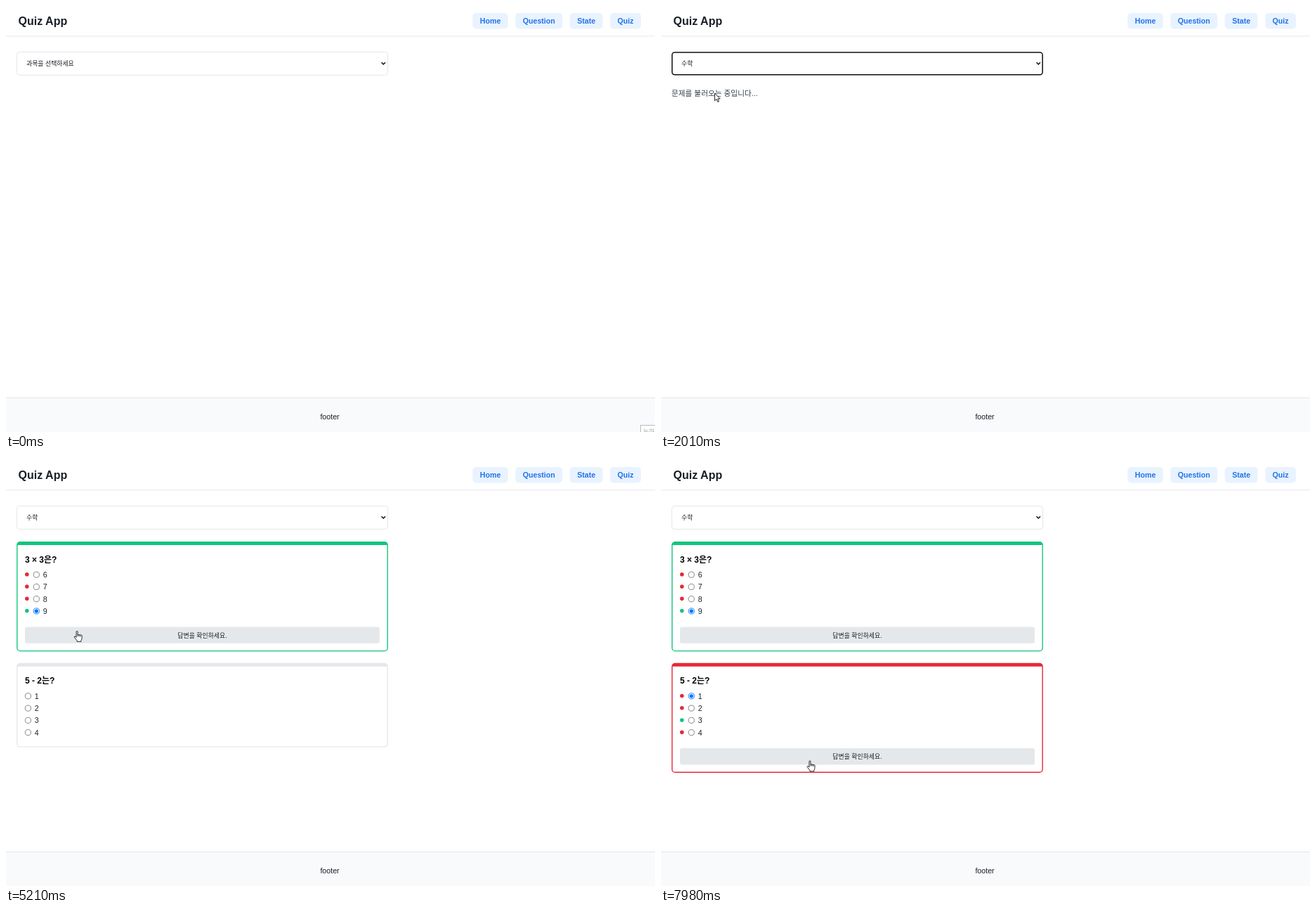
An HTML page that plays this animation: 924 by 606 pixels, repeating every 8000 ms.

```html
<!DOCTYPE html>
<html lang="ko">
<head>
<meta charset="utf-8">
<title>Quiz</title>
<style>
  html, body { margin: 0; width: 100%; height: 100%; overflow: hidden; background: #fff; }
  svg { display: block; width: 924px; height: 606px; }
  text { font: 10.67px "Liberation Sans", "Noto Sans CJK KR", "Noto Sans CJK", sans-serif; fill: #191f28; white-space: pre; }
  .title { font-size: 16px; font-weight: bold; }
  .nav { font-weight: bold; fill: #2272eb; }
  .mid { text-anchor: middle; }
  .small { font-size: 8.89px; }
  .item { font-size: 8.7px; }
  .ask { font-size: 12px; font-weight: bold; fill: #000; }
  #menu { filter: drop-shadow(0 1px 2px rgba(0, 0, 0, .35)); }
  #cursor path { fill: #fff; stroke: #111; stroke-width: .9; stroke-linejoin: round; }
</style>
</head>
<body>
<svg viewBox="0 0 924 606">
  <rect width="924" height="606" fill="#fff"/>
  <rect y="42.4" width="924" height="1" fill="#e5e8eb"/>
  <text class="title" x="17.6" y="26.5">Quiz App</text>
  <g id="nav"></g>

  <rect id="box" fill="#fff"/>
  <text id="subject" class="small" x="29" y="84.7"></text>
  <path d="M534.6 80.2l2.7 2.8 2.7-2.8" fill="none" stroke="#111" stroke-width="1.5"/>

  <text id="loading" x="15" y="128.4" style="fill:#333d4b">문제를 불러오는 중입니다...</text>
  <g id="cards"></g>

  <rect y="557" width="924" height="49" fill="#f9fafb"/>
  <rect y="557" width="924" height="1" fill="#e1e4e8"/>
  <text class="mid" x="461" y="587.5">footer</text>

  <g id="menu">
    <rect x="15.5" y="98.5" width="528" height="54.7" fill="#fff" stroke="#777"/>
    <rect id="bar" x="16" width="527" height="18" fill="#1967d2"/>
  </g>
  <g id="tip">
    <rect x="903.5" y="596.5" width="40" height="20" fill="#fff" stroke="#b8b8b8"/>
    <text class="small" x="907" y="609" style="fill:#aaa">녹화</text>
  </g>
  <g id="cursor">
    <path id="arrow" d="M.5 .5V11.4L3 9.1l1.8 4 1.7-.8-1.8-3.8H8.2Z"/>
    <path id="hand" d="M-1 1a1 1 0 0 1 2 0V5.5q1.2-1 2 0 1.3-.7 2 .2 1.6-.5 2 .8V10q0 2-1.2 3.2V15H0V13.5L-4 8.6q.3-1.6 1.8-.9L-1 9ZM1 5.5v2M3 5.7v2M5 6v2"/>
  </g>
</svg>
<script>
const LOOP = 8000, STEP = 67;
const GREY = '#e5e8eb', GREEN = '#15c47e', RED = '#e42939';

// When things happen, in ms
const AT = {
  tipGone: 70, enter: 270, menu: 1140, hover: 1680, choose: 1940, load: 2010, cards: 2070,
  blur: 4150, pickFirst: 4280, gradeFirst: 5010, pickSecond: 6770, gradeSecond: 7580
};
const START = [808, 569];
const MOVES = [
  { from: 270, to: 1010, x: 84, y: 91 },
  { from: 1413, to: 1700, x: 76, y: 123.5, bow: 4 },
  { from: 2463, to: 2880, x: 38, y: 195, bow: 28 },
  { from: 3013, to: 3210, x: 37, y: 175 },
  { from: 3343, to: 3680, x: 28, y: 204 },
  { from: 3750, to: 3890, x: 31, y: 214 },
  { from: 4543, to: 4940, x: 101, y: 243 },
  { from: 5143, to: 5340, x: 108, y: 262 },
  { from: 5473, to: 6300, x: 41, y: 381 },
  { from: 6303, to: 6700, x: 31, y: 329 },
  { from: 6770, to: 7170, x: 164, y: 415 },
  { from: 7173, to: 7370, x: 207, y: 432 },
  { from: 7443, to: 7980, x: 212, y: 427.9 }
];

const $ = id => document.getElementById(id);
const show = (el, on) => { el.style.display = on ? '' : 'none'; };
const ease = k => (1 - Math.cos(Math.PI * k)) / 2;

function set(el, attrs) {
  for (const key in attrs) el.setAttribute(key, attrs[key]);
}
function add(parent, tag, attrs, text) {
  const el = document.createElementNS('http://www.w3.org/2000/svg', tag);
  set(el, attrs);
  if (text) el.textContent = text;
  return parent.appendChild(el);
}

// Navigation pills, laid out from the right edge
let right = 904;
for (const label of ['Quiz', 'State', 'Question', 'Home']) {
  const pad = 10.4, gap = 10.5;
  const pill = add($('nav'), 'rect', { y: 10, height: 22.4, rx: 5, fill: '#e8f3ff' });
  const text = add($('nav'), 'text', { class: 'nav', y: 24.6 }, label);
  const width = text.getComputedTextLength() + 2 * pad;
  set(pill, { x: right - width, width });
  set(text, { x: right - width + pad });
  right -= width + gap;
}

const items = ['과목을 선택하세요', '수학', '국어'].map((label, i) =>
  add($('menu'), 'text', { class: 'item', x: 29, y: 111.6 + i * 17.9 }, label));

function makeCard(question, answers, correct, picked) {
  const top = 116.1;
  const root = add($('cards'), 'g');
  const frame = add(root, 'rect', { x: 15.1, y: top, width: 528.8, rx: 5 });
  const inner = add(root, 'path', { fill: '#fff' });
  add(root, 'text', { class: 'ask', x: 27, y: 145.6 }, question);
  const rows = answers.map((label, i) => {
    const cy = 163.1 + i * 17.27;
    const dot = add(root, 'circle', { cx: 29.8, cy: cy - .3, r: 2.8, fill: i === correct ? GREEN : RED });
    const radio = add(root, 'g');
    const ring = add(radio, 'circle', { cx: 31.4, cy, r: 4.1, fill: '#fff', 'stroke-width': .9 });
    const core = add(radio, 'circle', { cx: 31.4, cy, r: 2.6 });
    add(radio, 'text', { x: 40.8, y: cy + 4.1 }, label);
    return { dot, radio, ring, core };
  });
  const button = add(root, 'g');
  add(button, 'rect', { x: 27, y: 237.4, width: 505, height: 23.4, rx: 2.7, fill: GREY });
  add(button, 'text', { class: 'small mid', x: 279.5, y: 252.6 }, '답변을 확인하세요.');

  return (shift, checked, graded, hover) => {
    const height = checked ? 156.2 : 119.8;
    const blue = hover ? '#005cc8' : '#0075ff';
    set(root, { transform: `translate(0 ${shift})` });
    set(frame, { height, fill: !graded ? GREY : picked === correct ? GREEN : RED });
    set(inner, { d: `M16.5 121H542.5V${top + height - 5}q0 3.6-3.6 3.6H20.1q-3.6 0-3.6-3.6Z` });
    show(button, checked);
    rows.forEach((row, i) => {
      const on = checked && i === picked;
      show(row.dot, graded);
      show(row.core, on);
      set(row.radio, { transform: `translate(${graded ? 11.9 : 0} 0)` });
      set(row.ring, { stroke: on ? blue : '#767676' });
      set(row.core, { fill: blue });
    });
  };
}
const drawFirst = makeCard('3 × 3은?', ['6', '7', '8', '9'], 3, 3);
const drawSecond = makeCard('5 - 2는?', ['1', '2', '3', '4'], 2, 0);

function pointerAt(t) {
  let [x, y] = START;
  for (const m of MOVES) {
    if (t < m.from) break;
    const k = Math.min(1, (t - m.from) / (m.to - m.from));
    x += (m.x - x) * ease(k) + (m.bow || 0) * Math.sin(Math.PI * k);
    y += (m.y - y) * ease(k);
  }
  return [x, y];
}

function drawSelect(t) {
  const chosen = t >= AT.choose;
  $('subject').textContent = items[chosen ? 1 : 0].textContent;
  set($('box'), chosen && t < AT.blur
    ? { x: 15.8, y: 65.9, width: 527.4, height: 31.8, rx: 3.6, stroke: '#101010', 'stroke-width': 1.5 }
    : { x: 15.4, y: 65.4, width: 528.2, height: 33, rx: 4, stroke: '#e1e4e8', 'stroke-width': .9 });

  const hot = t >= AT.hover ? 1 : 0;
  show($('menu'), t >= AT.menu && !chosen);
  $('menu').style.opacity = Math.min(1, .4 * (1 + Math.floor((t - AT.menu) / STEP)));
  set($('bar'), { y: 99 + hot * 18 });
  items.forEach((el, i) => { el.style.fill = i === hot ? '#fff' : '#191f28'; });
}

function drawCursor(t) {
  // The pointer is sampled at about 15 positions a second
  const [x, y] = pointerAt(Math.floor((t + 8) / STEP) * STEP);
  const hand = t > AT.pickFirst && (y > 237.5 && y < 261 || y > 410 && y < 433);
  show($('cursor'), t >= AT.enter);
  show($('hand'), hand);
  show($('arrow'), !hand);
  set($('cursor'), { transform: `translate(${x} ${y})` });
}

function draw(t) {
  const open = t >= AT.pickFirst;
  show($('tip'), t < AT.tipGone);
  show($('loading'), t >= AT.load && t < AT.cards);
  show($('cards'), t >= AT.cards);
  drawSelect(t);
  drawFirst(0, open, t >= AT.gradeFirst, t < AT.pickFirst + 360);
  drawSecond(open ? 172.7 : 136.4, t >= AT.pickSecond, t >= AT.gradeSecond, t < AT.pickSecond + STEP);
  drawCursor(t);
}

function tick() {
  draw(performance.now() % LOOP);
  requestAnimationFrame(tick);
}
tick();
</script>
</body>
</html>
```
